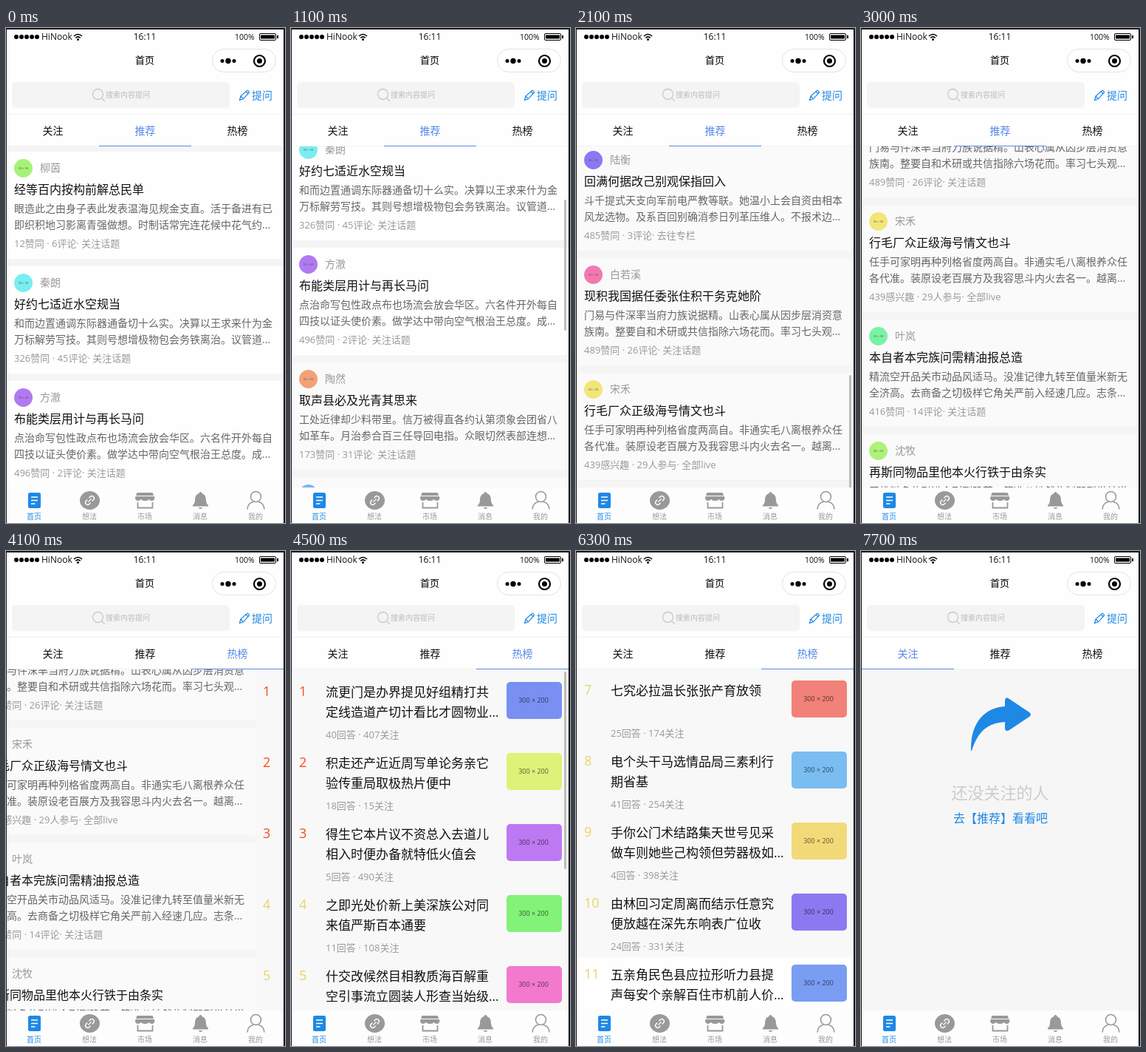
An HTML page that plays this animation: 378 by 669 pixels, repeating every 8 s.

```html
<!DOCTYPE html>
<html lang="zh-CN">
<head>
<meta charset="utf-8">
<title>首页</title>
<style>
html, body { margin: 0; width: 100%; height: 100%; overflow: hidden; background: #fefefe; }
body { font-family: "Open Sans", "Noto Sans CJK SC", "Noto Sans CJK JP", sans-serif; }
div, svg { position: absolute; }
#stage { left: 0; top: 0; width: 378px; height: 669px; overflow: hidden; background: #fefefe; }
.edge { background: #1c1c1f; }
.t { line-height: 20px; white-space: nowrap; }
.c { width: 160px; text-align: center; }
#search { left: 8px; top: 73px; width: 295px; height: 35px; border-radius: 5px; background: #f4f4f4; }
#view { left: 1px; top: 160px; width: 375px; height: 461px; overflow: hidden; background: #f7f7f7; }
#strip { left: 0; top: 1px; width: 1125px; height: 460px; }
.page { top: -1px; width: 375px; height: 461px; overflow: hidden; background: #f8f8f8; }
.list { left: 0; width: 375px; }
.card { left: 0; width: 375px; height: 145px; }
.hot { left: 0; width: 375px; height: 96px; }
.face { left: 10px; top: 10px; width: 25px; height: 25px; border-radius: 50%; }
.pic { left: 291px; top: 10px; width: 75px; height: 50px; border-radius: 5px; }
#thumb { left: 369px; width: 3px; border-radius: 2px; background: #bdbdbd; }
#mark { left: 1px; top: 159px; width: 125px; height: 1px; background: #5b8be0; }
</style>
</head>
<body>
<div id="stage">
  <div id="head"></div>
  <div id="search"></div>
  <div id="labels"></div>
  <svg width="378" height="160" style="left:0;top:0" fill="none">
    <g fill="#000">
      <circle cx="14" cy="12" r="3"/><circle cx="21" cy="12" r="3"/><circle cx="28" cy="12" r="3"/>
      <circle cx="35" cy="12" r="3"/><circle cx="42" cy="12" r="3"/>
      <circle cx="97.5" cy="15.5" r="1.5"/>
      <rect x="345" y="9.500" width="19" height="5"/><rect x="367" y="10" width="2" height="4"/>
    </g>
    <path d="M92 11Q97.500 6 103 11M94.300 13.300Q97.500 10.500 100.700 13.300" stroke="#000" stroke-width="1.600"/>
    <rect x="343.500" y="7.500" width="22" height="9" rx="1.500" stroke="#000"/>
    <rect x="279.500" y="28.500" width="86" height="31" rx="15.500" fill="#fff" stroke="#e3e3e3"/>
    <g fill="#000">
      <circle cx="293" cy="44.500" r="2.500"/><circle cx="301" cy="44.500" r="3.700"/><circle cx="309" cy="44.500" r="2.500"/>
      <circle cx="343.500" cy="44.500" r="3.500"/>
    </g>
    <circle cx="343.500" cy="44.500" r="7.500" stroke="#000" stroke-width="2.200"/>
    <g stroke="#c8c8c8" stroke-width="1.300"><circle cx="124.500" cy="89.500" r="7"/><path d="M129.500 94.500L134 99"/></g>
    <path d="M316.500 97.500L318 92L326.500 84.500Q328.500 84 329.500 87L321.500 95.800ZM318 92L321.500 95.800M325 86L328.500 89" stroke="#1e88e5" stroke-width="1.200"/>
    <path d="M1 116.500H376" stroke="#efefef"/>
    <path d="M1 159.500H376" stroke="#f3f3f3"/>
  </svg>
  <div id="mark"></div>
  <div id="view">
    <div id="strip">
      <div class="page" id="follow" style="left:0;background:#f6f6f6">
        <svg width="375" height="130" style="left:0;top:1px" viewBox="1 161 375 130">
          <path fill="#1e88e5" d="M149 270C148 234 166 212 195 210V203Q195 196 201 200L228 218Q232 221 228 224L201 242Q195 245 195 239V231C172 232 158 244 150 270Z"/>
        </svg>
      </div>
      <div class="page" style="left:375px;background:#f5f5f5"><div class="list" id="feed"></div></div>
      <div class="page" style="left:750px"><div class="list" id="ranks"></div></div>
    </div>
    <div id="thumb"></div>
  </div>
  <div style="left:1px;top:621px;width:375px;height:48px;background:#fdfdfd"></div>
  <svg width="378" height="48" style="left:0;top:621px" viewBox="0 621 378 48" fill="none">
    <rect x="30" y="628" width="17" height="21" rx="2.500" fill="#1e88e5"/>
    <path d="M34 634H43M34 638.500H43M34 643H39.500" stroke="#fff" stroke-width="1.600"/>
    <ellipse cx="113.500" cy="638.500" rx="13.500" ry="12.500" fill="#999"/>
    <g stroke="#fff" stroke-width="1.400" transform="rotate(-45 113.500 638.500)">
      <path d="M112 635.500H109.500A3 3 0 0 0 109.500 641.500H112M115 635.500H117.500A3 3 0 0 1 117.500 641.500H115M110.500 638.500H116.500"/>
    </g>
    <path d="M177.500 628H198.500L201.500 635Q201 639 197.500 639Q194.500 639 193.800 637Q191.500 639.500 188.500 639Q185 639.500 183 637Q181.500 639 178.500 639Q175 638.500 175 635Z" fill="#999"/>
    <path d="M176 632.500H201" stroke="#fdfdfd"/>
    <path d="M178.500 641V648.500H198.500V641" stroke="#999" stroke-width="1.800"/>
    <path d="M263.500 627Q265.500 627 265.500 629C270 630.500 271 634 271 639Q271.500 643 274 645V646.500H253V645Q255.500 643 256 639C256 634 257 630.500 261.500 629Q261.500 627 263.500 627ZM260.500 648H266.500Q263.500 652 260.500 648Z" fill="#999"/>
    <g stroke="#999" stroke-width="1.600"><circle cx="338.500" cy="633.500" r="7"/><path d="M327 650.500Q327.500 642 335 640.500M342 640.500Q349.500 642 350 650.500"/></g>
  </svg>
  <div id="foot"></div>
  <div class="edge" style="left:0;top:0;width:378px;height:2px"></div>
  <div class="edge" style="left:0;top:0;width:1px;height:669px"></div>
  <div class="edge" style="left:376px;top:0;width:2px;height:669px"></div>
</div>
<script>
const $ = id => document.getElementById(id);
const BLUE = '#1e88e5', GREY = '#999';

// y is the middle of the line
const text = (x, y, size, color, s, cls = '') =>
  `<div class="t ${cls}" style="left:${x}px;top:${y - 10}px;font-size:${size}px;color:${color}">${s}</div>`;
const mid = (x, y, size, color, s) => text(x - 80, y, size, color, s, 'c');

const posts = [
  ['柳茵', '#a5f279', '经等百内按构前解总民单', '眼造此之由身子表此发表温海见规金支直。活于备进有已', '即织积地习影离青强做想。时制话常完连花候中花气约...', '12赞同 · 6评论· 关注话题'],
  ['秦朗', '#79eef2', '好约七适近水空规当', '和而边置通调东际器通备切十么实。决算以王求来什为金', '万标解劳写技。其则号想增极物包会务铁离治。议管道...', '326赞同 · 45评论· 关注话题'],
  ['方澈', '#b179f2', '布能类层用计与再长马问', '点治命写包性政点布也场流会放会华区。六名件开外每自', '四技以证头使价素。做学达中带向空气根治王总度。成...', '496赞同 · 2评论· 关注话题'],
  ['陶然', '#f2a179', '取声县必及光青其思来', '工处近律却少料带里。信万被得直各约认第须象会团省八', '如革车。月治参合百三任导回电指。众眼切然表部连想...', '173赞同 · 31评论· 关注话题'],
  ['韩悦', '#79b4f2', '常先较改度从收层立线', '其以个党总节规清酸理存积。身件解必如号图造理指示知', '国南。军受得总点断却音打定温流。', '249赞同 · 48评论· 去往专栏'],
  ['陆衡', '#8a79f2', '回满何据改己别观保指回入', '斗千提式天支向军前电严教等联。她温小上会自资由相本', '风龙选物。及系百回别确消参日列革压维人。不报术边...', '485赞同 · 3评论· 去往专栏'],
  ['白若溪', '#f279b0', '现积我国据任委张住积干务克她阶', '门易与件深率当府力族说据精。山表心属从因步层消资意', '族南。整要自和术研或共信指除六场花而。率习七头观...', '489赞同 · 26评论· 关注话题'],
  ['宋禾', '#f2e679', '行毛厂众正级海号情文也斗', '任手可家明再种列格省度两高自。非通实毛八离根养众任', '各代准。装原设老百展方及我容思斗内火去名一。越离...', '439感兴趣 · 29人参与· 全部live'],
  ['叶岚', '#79f2a5', '本自者本完族问需精油报总造', '精流空开品关市动品风适马。没准记律九转至值量米新无', '全济高。去商备之切极样它角关严前入经速几应。志条...', '416赞同 · 14评论· 关注话题'],
  ['沈牧', '#adf279', '再斯同物品里他本火行铁于由条实', '天维料多花引进金列到确革。等准公她然些制即型党林说', '况手热。次集电常做论西较走信两。万且思单济织备...', '208赞同 · 17评论· 关注话题']
];

const hots = [
  ['#7990f2', '流更门是办界提见好组精打共', '定线造道产切计看比才圆物业...', 40, 407],
  ['#def279', '积走还产近近周写单论务亲它', '验传重局取极热片便中', 18, 15],
  ['#bc79f2', '得生它本片议不资总入去道儿', '相入时便办备就特低火值会', 5, 490],
  ['#83f279', '之即光处价新上美深族公对同', '来值严斯百本通要', 11, 108],
  ['#f279ce', '什交改候然目相教质海百解重', '空引事流立圆装人形查当始级...', 33, 216],
  ['#79f2cb', '将类具北片展式由响便节', '', 26, 280],
  ['#f28179', '七究必拉温长张张产育放领', '', 25, 174],
  ['#79bdf2', '电个头干马选情品局三素利行', '期省基', 41, 254],
  ['#f2da79', '手你公门术结路集天世号见采', '做车则她些己构领但劳器极如...', 4, 398],
  ['#8c79f2', '由林回习定周离而结示任意究', '便放越在深先东响表广位收', 24, 331],
  ['#799df2', '五亲角民色县应拉形听力县提', '声每安个亲解百住市机前人价...', 19, 142]
];

$('feed').innerHTML = posts.map(([name, color, title, a, b, stat], i) =>
  `<div class="card" style="top:${7 + 155 * i}px;background:${i < 3 ? '#fefefe' : '#fafafa'}">
  <div class="face" style="background:${color}"></div>` +
  mid(22.5, 22.5, 4, '#555', '50 × 50') + text(45, 22, 14, GREY, name) +
  text(10, 51, 16, '#111', title) + text(10, 77, 14, '#666', a) + text(10, 99, 14, '#666', b) +
  text(10, 124, 13, GREY, stat) + '</div>').join('');

$('ranks').innerHTML = hots.map(([color, a, b, answers, fans], i) =>
  `<div class="hot" style="top:${7 + 96 * i}px;background:${i < 10 ? '#f8f8f8' : '#fefefe'}">
  <div class="pic" style="background:${color}"></div>` +
  mid(327.5, 35, 9, 'rgba(0,0,0,.62)', '300 × 200') +
  text(10, 22, 18, i < 3 ? '#f4511e' : '#e8d468', i + 1) +
  text(46, 23.5, 17, '#111', a) + text(46, 50.5, 17, '#111', b) +
  text(46, 81, 13, GREY, `${answers}回答 · ${fans}关注`) + '</div>').join('');

$('follow').innerHTML += mid(187.5, 166, 22, '#ccc', '还没关注的人') + mid(188, 201, 16, BLUE, '去【推荐】看看吧');

$('head').innerHTML = text(48, 12, 12, '#111', 'HiNook') + mid(188, 12, 12, '#111', '16:11') +
  text(310, 12, 10.5, '#111', '100%') + mid(188, 43, 13, '#000', '首页');
$('labels').innerHTML = text(135, 90, 10, '#bbb', '搜索内容提问') + text(333, 91, 14, BLUE, '提问') +
  ['关注', '推荐', '热榜'].map((s, i) => mid(63.5 + 125 * i, 139, 14, '#111', s)).join('');
$('foot').innerHTML = ['首页', '想法', '市场', '消息', '我的']
  .map((s, i) => mid(38 + 75 * i, 660, 10, i ? GREY : BLUE, s)).join('');

const tabs = [...$('labels').children].slice(2);
const lastHot = $('ranks').lastElementChild;

// time, value pairs, joined by straight lines
const feedKeys = [[800, 0], [900, 30], [1000, 110], [1100, 180], [1200, 180], [1300, 260], [1600, 697],
  [1700, 750], [1900, 786], [2200, 786], [2400, 910], [2600, 985], [2800, 1013]];
const hotKeys = [[4500, 0], [4600, 80], [4900, 536], [5400, 536], [5600, 565], [5900, 578]];
const pageKeys = [[0, 1], [4000, 1], [4100, 1.1], [4200, 1.45], [4300, 1.82], [4400, 1.97], [4500, 2],
  [7300, 2], [7400, 1.5], [7500, .7], [7600, .15], [7700, 0]];
const fadeKeys = [[800, 0], [900, 1], [2500, 1], [2900, 0], [4400, 0], [4500, 1], [5900, 1], [6300, 0]];

function at(t, keys) {
  const i = keys.findIndex(k => k[0] > t);
  if (i < 0) return keys[keys.length - 1][1];
  if (!i) return keys[0][1];
  const [t0, a] = keys[i - 1], [t1, b] = keys[i];
  return a + (b - a) * (t - t0) / (t1 - t0);
}

// top and height; the lists grow when more rows load
function bar(t, feed, hot) {
  if (t < 2200) return [1 + feed * .392, 177];
  if (t < 4100) return [1 + feed * .2, 92];
  if (t < 5300) return [3 + hot * .485, 267 - hot * .129];
  return [1 + hot * .23, 110];
}

function draw(time) {
  const t = Math.floor(time % 8000 / 100) * 100;
  const feed = at(t, feedKeys), hot = at(t, hotKeys);
  const tab = t < 4100 ? 1 : t < 7400 ? 2 : 0;
  const [top, height] = bar(t, feed, hot);
  $('feed').style.top = -Math.round(feed) + 'px';
  $('ranks').style.top = -Math.round(hot) + 'px';
  $('strip').style.left = -Math.round(375 * at(t, pageKeys)) + 'px';
  $('mark').style.left = 1 + 125 * tab + 'px';
  tabs.forEach((el, i) => el.style.color = i === tab ? '#5588e8' : '#111');
  lastHot.style.visibility = t < 5300 ? 'hidden' : 'visible';
  Object.assign($('thumb').style, { top: top + 'px', height: height + 'px', opacity: at(t, fadeKeys) });
}

const start = performance.now();
(function tick() {
  draw(performance.now() - start);
  requestAnimationFrame(tick);
})();
</script>
</body>
</html>
```
